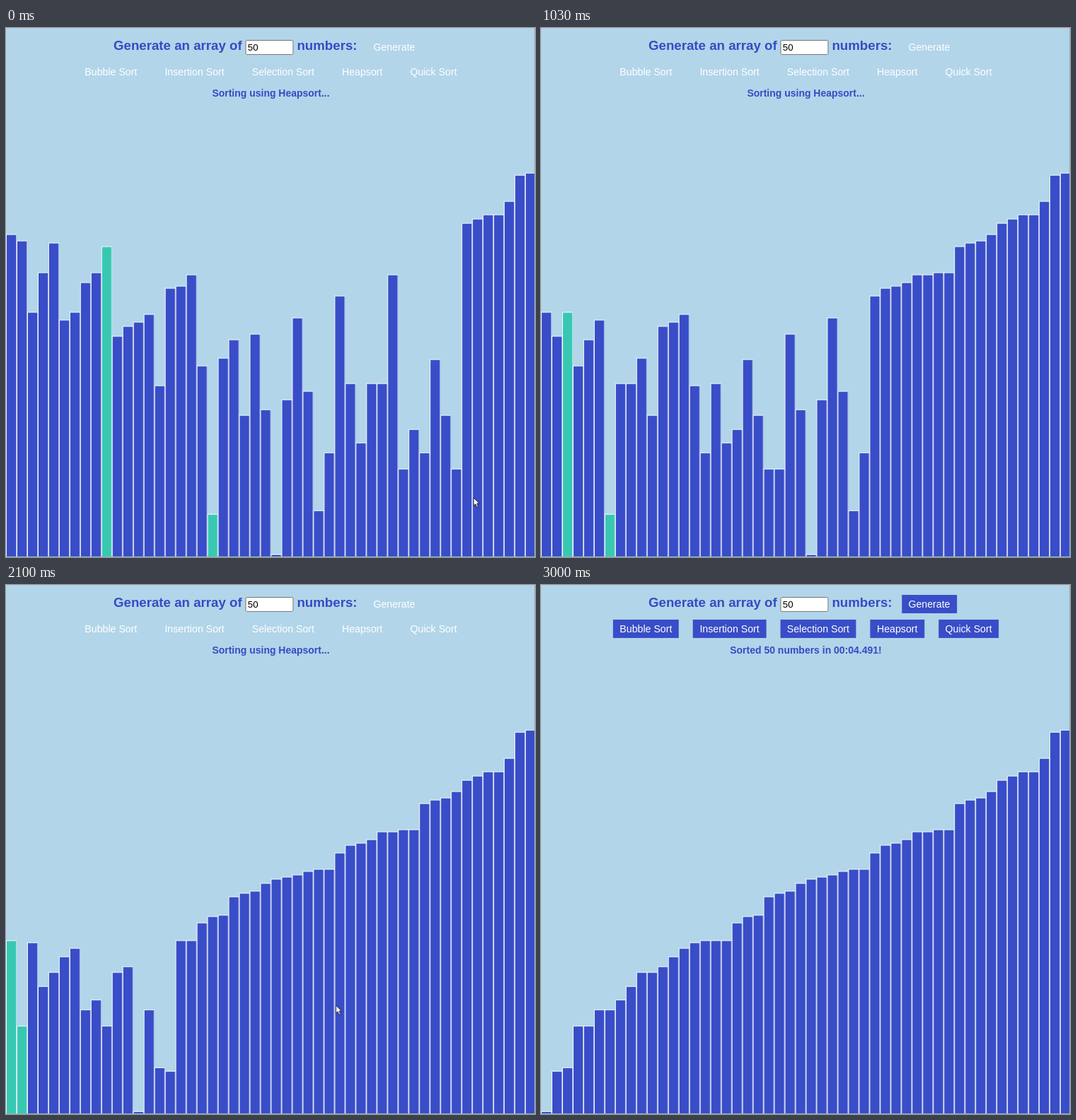
An HTML page with a canvas for the animation above (3300 ms loop, 748 by 748 pixels).

```html
<!DOCTYPE html>
<html lang="en">
<head>
<meta charset="utf-8">
<title>Heapsort</title>
<style>
  html, body { margin: 0; width: 100%; height: 100%; overflow: hidden; background: #b2d5e9; }
  #page {
    position: absolute; width: 750px; height: 749px; overflow: hidden;
    transform: scale(calc(748 / 749)); transform-origin: 0 0;
    font: 14px "Liberation Sans", Arial, sans-serif; color: #364bc5;
  }
  canvas, .row { position: absolute; left: 0; top: 0; }
  .row { width: 100%; display: flex; justify-content: center; white-space: nowrap; }
  .title { top: 12px; left: 152.2px; justify-content: flex-start; gap: 5.2px; font: bold 18.72px/25px "Liberation Sans", Arial, sans-serif; }
  .field {
    box-sizing: border-box; width: 67.5px; height: 21px; margin-top: 5px; padding-left: 2px;
    border: 1px solid #767676; border-radius: 2px; background: #fff;
    font: 13.333px/19px "Liberation Sans", Arial, sans-serif; color: #000;
  }
  .button { padding: 0 9.4px; height: 26px; font: 14.2px/26px "Liberation Sans", Arial, sans-serif; color: #fff; }
  .title .button { margin: 2px 0 0 8.3px; }
  .sorts { top: 49px; gap: 20.3px; }
  .status { top: 84px; font-weight: bold; line-height: 16px; }
  .done .button { background: #384dc7; }
</style>
</head>
<body>
<div id="page">
  <canvas id="chart" width="750" height="749"></canvas>
  <div class="row title">
    <span>Generate an array of</span><span class="field">50</span><span>numbers:</span>
    <span class="button">Generate</span>
  </div>
  <div class="row sorts">
    <span class="button">Bubble Sort</span>
    <span class="button">Insertion Sort</span>
    <span class="button">Selection Sort</span>
    <span class="button">Heapsort</span>
    <span class="button">Quick Sort</span>
  </div>
  <div class="row status" id="status"></div>
</div>
<script>
const LOOP = 3300, SORTED_AT = 2820;
const WIDTH = 750, HEIGHT = 749, BAR = 15, UNIT = HEIGHT * 0.00375;
const page = document.getElementById('page');
const ctx = document.getElementById('chart').getContext('2d');
const statusLine = document.getElementById('status');

// The array being sorted; every later state follows from the algorithm
const values = [
  162, 159, 123, 143, 158, 119, 123, 138, 143, 156, 111, 116, 118, 122, 86, 135, 136,
  142, 96, 21, 100, 109, 71, 112, 74, 1, 79, 120, 83, 23, 52, 131, 87, 57, 87, 87, 142,
  44, 64, 52, 99, 71, 44, 168, 170, 172, 172, 179, 192, 193
];
const steps = [];

function record(size, i, j) {
  steps.push({ bars: values.slice(), size, i, j });
}

function swap(size, i, j) {
  [values[i], values[j]] = [values[j], values[i]];
  record(size, i, j);
}

function sift(size, i) {
  let top = i;
  for (const child of [2 * i + 1, 2 * i + 2]) {
    if (child < size && values[child] > values[top]) top = child;
  }
  if (top === i) return;
  swap(size, i, top);
  sift(size, top);
}

// The loop begins with 9 and 19 just swapped
record(43, 9, 19);
sift(43, 19);
for (let size = 42; size > 0; size--) {
  swap(size, 0, size);
  sift(size, 0);
}
record(0, -1, -1);

// Key moments: time, heap size, child being swapped
const keys = [
  [0, 43, 19], [650, 36, 31], [1030, 31, 6], [1510, 25, 12],
  [1890, 19, 3], [2360, 11, 4], [SORTED_AT, 0, -1]
].map(([time, size, j]) => ({ time, step: steps.findIndex(s => s.size === size && s.j === j) }));

// Refreshes come faster as the heap shrinks
const refreshGap = time => 77 - 0.0155 * time;

// Holds the picture between refreshes, which are even within each pair of keys
function stateAt(time) {
  if (time >= SORTED_AT) return { time: SORTED_AT, step: steps[steps.length - 1] };
  const k = keys.findIndex(key => key.time > time);
  const a = keys[k - 1], b = keys[k], length = b.time - a.time;
  const count = Math.round(length / refreshGap(a.time + length / 2));
  const part = Math.floor((time - a.time) / length * count) / count;
  return {
    time: a.time + length * part,
    step: steps[Math.round(a.step + (b.step - a.step) * part)]
  };
}

function cursorAt(time) {
  if (time < 1000) {
    const p = Math.min(1, time / 520);
    return [662 - 198 * p, 665 - 75 * p];
  }
  if (time >= 1200 && time < SORTED_AT) return [467, 595];
  return null;
}

const arrow = new Path2D('M0 0V11.5L2.7 9L4.6 13.6L6.7 12.7L4.8 8.2H8.2Z');

function drawCursor(x, y) {
  ctx.save();
  ctx.translate(Math.round(x), Math.round(y));
  ctx.fillStyle = '#fff';
  ctx.strokeStyle = '#1a1a2a';
  ctx.fill(arrow);
  ctx.stroke(arrow);
  ctx.restore();
}

function rect(color, x, y, w, h) {
  ctx.fillStyle = color;
  ctx.fillRect(x, y, w, h);
}

function draw(time) {
  const { time: shownAt, step: { bars, i, j } } = stateAt(time);
  ctx.clearRect(0, 0, WIDTH, HEIGHT);
  bars.forEach((value, k) => {
    const x = BAR * k, top = Math.round(HEIGHT - 1.6 - UNIT * value);
    rect('#f4f8fd', x, top, BAR, HEIGHT - top);
    rect(k === i || k === j ? '#38c8b2' : '#384dc7', x + 1, top + 1, BAR - 1.6, HEIGHT - top - 2);
  });
  rect('#93b0c4', HEIGHT - 1, 0, 1, HEIGHT);
  rect('#93b0c4', 0, HEIGHT - 1, WIDTH, 1);
  const cursor = cursorAt(shownAt);
  if (cursor) drawCursor(...cursor);

  const done = time >= SORTED_AT;
  page.classList.toggle('done', done);
  statusLine.textContent = done ? 'Sorted 50 numbers in 00:04.491!' : 'Sorting using Heapsort...';
}

const began = performance.now();

function frame() {
  draw((performance.now() - began) % LOOP);
  requestAnimationFrame(frame);
}
frame();
</script>
</body>
</html>
```
